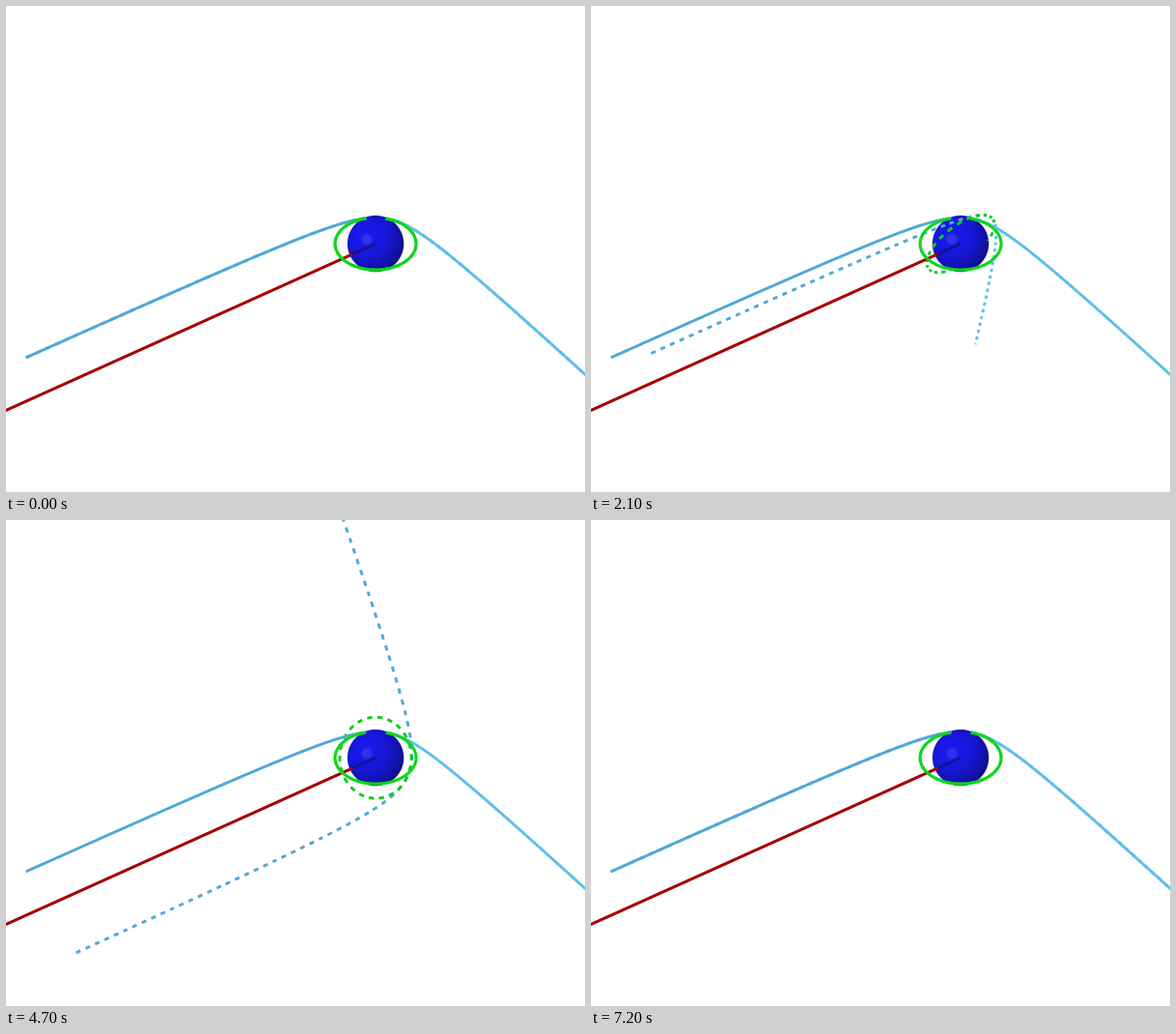
These frames come from a looping animation (600 px wide and 503 px high, 7.3 s). A matplotlib script:

```python
import numpy as np
import matplotlib.pyplot as plt
from matplotlib.animation import FuncAnimation
from matplotlib.collections import LineCollection

W, H, DPI = 600, 503, 100
FRAMES, INTERVAL = 73, 100
CX, CY = 383.0, 246.1           # planet centre on the stage
R_BALL, R_ORBIT = 29.2, 42
TILT, HEADING = np.radians(40), np.radians(35)
ASYM, BEND = 59.6, 29.8         # asymptote offset and bend of the flyby path
Z_MIN, Z_MAX, Y_MAX = -200, 291, 274
DASH = 11.85

DARK_BLUE = np.array([80, 168, 214]) / 255
LIGHT_BLUE = np.array([96, 190, 235]) / 255
GREEN = np.array([10, 216, 24]) / 255
DASH_GREEN = np.array([14, 203, 28]) / 255
RED = np.array([166, 2, 4]) / 255
INNER = (0.07, 0.07, 0.58)

AXIS = np.array([np.cos(HEADING), np.sin(HEADING), 0])
SIDE = np.array([-np.sin(HEADING), np.cos(HEADING), 0])
UP = np.array([0, 0, 1.0])


def project(p):
    """World points to stage pixels and depth towards the viewer."""
    x, y, z = p.T
    sx = CX + x
    sy = CY - y * np.sin(TILT) - z * np.cos(TILT)
    depth = z * np.sin(TILT) - y * np.cos(TILT)
    return np.column_stack([sx, sy]), depth


def resample(a, b, step=0.8):
    """Even spacing along a plane curve, with the running length."""
    s = np.concatenate([[0], np.cumsum(np.hypot(np.diff(a), np.diff(b)))])
    even = np.arange(0, s[-1], step)
    return np.interp(even, s, a), np.interp(even, s, b), even


def flyby_curve():
    t = np.linspace(np.log((ASYM + 402) / BEND), -np.log((ASYM + 520) / BEND), 4000)
    return resample(ASYM - BEND * np.exp(t), ASYM - BEND * np.exp(-t))


def circle_curve():
    t = np.linspace(0, 2 * np.pi, 1000)
    return resample(R_ORBIT * np.cos(t), R_ORBIT * np.sin(t), 0.4)


FLYBY = flyby_curve()
CIRCLE = circle_curve()


def place(curve, angle):
    a, b, _ = curve
    side = SIDE * np.cos(angle) + UP * np.sin(angle)
    return np.outer(a, AXIS) + np.outer(b, side)


def runs(mask, longest=10**6):
    """Index slices of the unbroken true stretches of a mask."""
    edges = np.flatnonzero(np.diff(np.concatenate([[0], mask.astype(int), [0]])))
    for lo, hi in zip(edges[::2], edges[1::2]):
        for i in range(lo, hi, longest):
            yield slice(i, min(i + longest + 2, hi))


def blue_tone(line):
    d = line[-1] - line[0]
    slope = d[1] / (np.hypot(*d) + 1e-9)
    k = np.clip((slope + 0.3) / 0.75, 0, 1)
    return DARK_BLUE + (LIGHT_BLUE - DARK_BLUE) * k


def pieces(curve, angle, period=None, tone=blue_tone):
    """Visible lines with colours, and the lines behind the planet."""
    p = place(curve, angle)
    xy, depth = project(p)
    keep = (p[:, 2] > Z_MIN) & (p[:, 2] < Z_MAX) & (p[:, 1] < Y_MAX)
    if period:
        keep &= curve[2] % period < period * 0.53
    rho = np.hypot(xy[:, 0] - CX, xy[:, 1] - CY)
    hidden = (depth < 0) & (rho < R_BALL - 1)
    shown = [xy[s] for s in runs(keep & ~hidden, 24) if s.stop - s.start > 1]
    behind = [xy[s] for s in runs(keep & hidden) if s.stop - s.start > 1]
    return shown, [tone(line) for line in shown], behind


def ball_image(scale=4):
    n = 64 * scale
    g = (np.arange(n) + 0.5) / scale - 32
    x, y = np.meshgrid(g, g)
    rho = np.hypot(x, y)
    nx, ny = x / R_BALL, -y / R_BALL
    nz = np.sqrt(np.clip(1 - nx**2 - ny**2, 0, 1))
    light = np.clip(0.64 - 0.14 * nx + 0.11 * ny + 0.32 * nz, 0, 1)
    spot = np.clip((6.5 - np.hypot(x + 9, y + 4.5)) / 2, 0, 1) * 0.09
    img = np.empty((n, n, 4))
    img[..., 0] = img[..., 1] = 0.1 * light + spot
    img[..., 2] = 0.93 * light
    img[..., 3] = np.clip((R_BALL - rho) * scale + 0.5, 0, 1)
    return img


fig = plt.figure(figsize=(W / DPI, H / DPI), dpi=DPI, facecolor="white")
ax = fig.add_axes([0, 0, 1, 1])
ax.axis("off")
ax.imshow(ball_image(), extent=(CX - 32, CX + 32, CY + 32, CY - 32),
          aspect="auto", interpolation="antialiased", zorder=2)
ax.set_xlim(0, W)
ax.set_ylim(H, 0)


def strokes(px, z, **kw):
    lines = LineCollection([], linewidths=px * 72 / DPI, capstyle="butt", zorder=z, **kw)
    ax.add_collection(lines, autolim=False)
    return lines


def fill(lines, parts):
    lines.set_segments(parts[0])
    lines.set_color(parts[1])


ghost = strokes(2.6, 3, colors=[INNER], alpha=0.3)
dash_path = strokes(2.9, 4)
dash_ring = strokes(2.9, 5)
path = strokes(2.9, 6)
ring = strokes(3.1, 7)

solid_path = pieces(FLYBY, 0)
solid_ring = pieces(CIRCLE, 0, tone=lambda line: GREEN)
fill(path, solid_path)
fill(ring, solid_ring)

# The approach axis, darker where it runs inside the planet
axis_xy, _ = project(np.outer([-500, -R_BALL, 0], AXIS))
ax.plot(*axis_xy[:2].T, color=RED, lw=2.2, zorder=6, solid_capstyle="butt")
ax.plot(*axis_xy[1:].T, color=INNER, lw=2.0, zorder=3, solid_capstyle="butt")


def draw(i):
    angle = 2 * np.pi * i / (FRAMES - 1)
    curve = pieces(FLYBY, angle, DASH)
    orbit = pieces(CIRCLE, angle, 2 * np.pi * R_ORBIT / 22, lambda line: DASH_GREEN)
    fill(dash_path, curve)
    fill(dash_ring, orbit)
    ghost.set_segments(curve[2] + orbit[2])
    return dash_path, dash_ring, ghost


anim = FuncAnimation(fig, draw, frames=FRAMES, interval=INTERVAL,
                     repeat=True, repeat_delay=0, blit=False)
plt.show()
```
